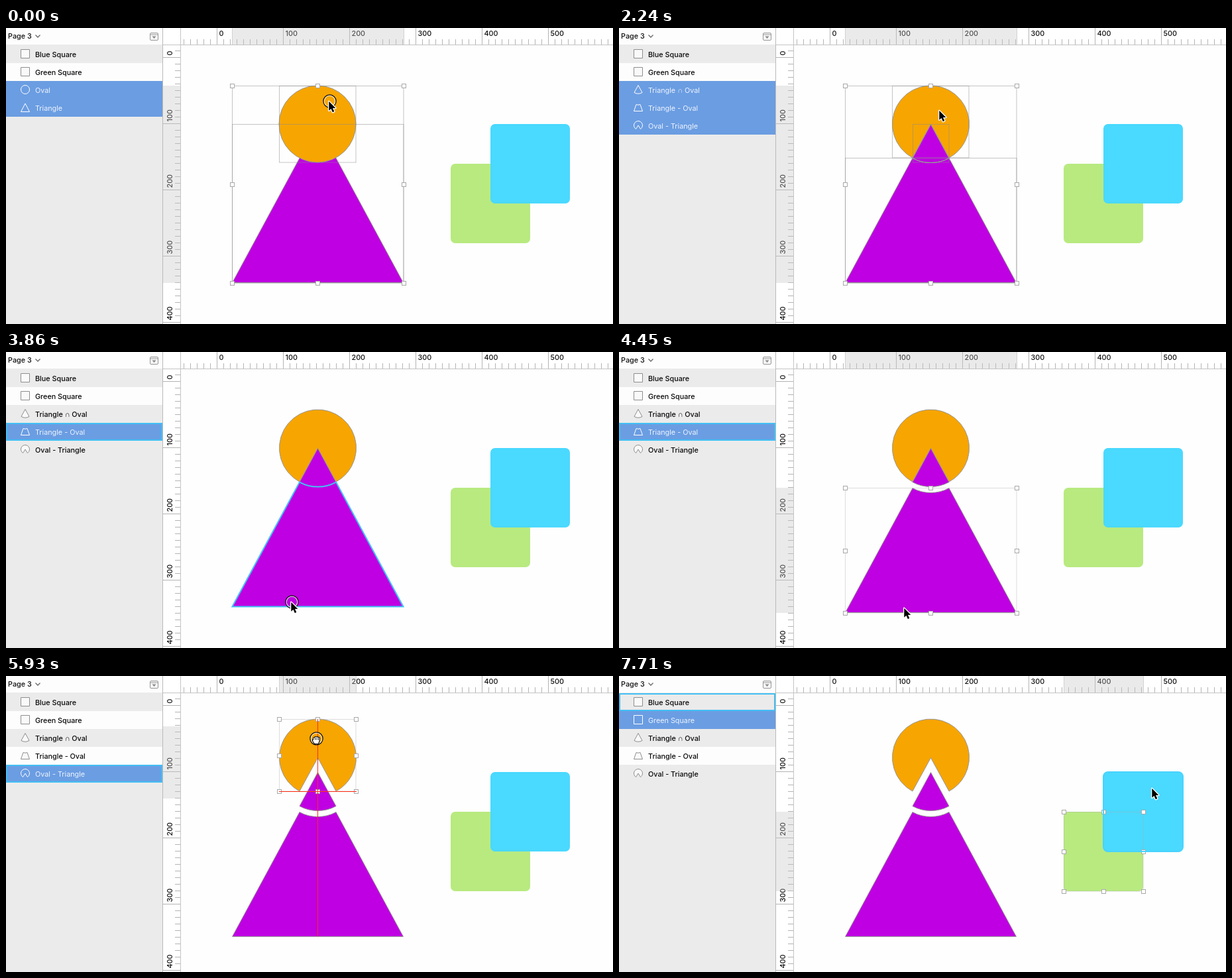
An HTML page with a canvas for the animation above (8000 ms loop, 916 by 447 pixels).

```html
<!DOCTYPE html>
<html lang="en">
<head>
<meta charset="utf-8">
<title>Shape editor</title>
<style>
html, body { margin: 0; width: 100%; height: 100%; overflow: hidden; background: #fefefe; }
canvas { display: block; width: 916px; height: 447px; }
</style>
</head>
<body>
<canvas id="stage" width="916" height="447"></canvas>
<script>
const W = 916, H = 447, LOOP = 8000;
const SIDE = 236, ROW = 27, TOP = 26;
const c = document.getElementById('stage').getContext('2d');
const FONT = '10.8px Inter, Roboto, sans-serif';
const GREY = '#979797', ACCENT = '#42bff5', PICKED = '#6b9de2';

// Shape geometry: the oval is centred on the tip of the triangle.
const CX = 470.5, CY = 145.5, R = 58, BASE = 384.5, HALF = 129;
const A = Math.atan(HALF / (BASE - CY));
const DX = R * Math.sin(A), DY = R * Math.cos(A);
const DOWN = Math.PI / 2;

const shapes = {
  blue: { name: 'Blue Square', fill: '#4ad9ff', box: [731, 145, 120, 120] },
  green: { name: 'Green Square', fill: '#b8ea80', box: [671, 205, 120, 120] },
  oval: { name: 'Oval', fill: '#f7a500', box: [412, 87, 116, 116] },
  tri: { name: 'Triangle', fill: '#bf00e2', box: [341, 145, 259, 240] },
  cone: { name: 'Triangle ∩ Oval', fill: '#bf00e2', box: [443, 145, 55, 58] },
  skirt: { name: 'Triangle - Oval', fill: '#bf00e2', box: [341, 196, 259, 189] },
  pac: { name: 'Oval - Triangle', fill: '#f7a500', box: [412, 87, 116, 109] }
};
const whole = ['blue', 'green', 'oval', 'tri'];
const split = ['blue', 'green', 'cone', 'skirt', 'pac'];
const parts = ['cone', 'skirt', 'pac'];

// [time, pointer x, pointer y, changes]; changes carry over to later steps.
// rows: picked rows, sel: shapes with handles, hot: outlined row, glow: outlined shape
const steps = [
  [0, 488, 110, { list: whole, rows: ['oval', 'tri'], sel: ['oval', 'tri'], ring: true,
    hot: '', glow: '', hand: false, skirt: 0, pac: 0, lag: 0, guide: '' }],
  [150, 488, 110, { ring: false }],
  [1790, 488, 110, { rows: [] }],
  [1940, 488, 110, { list: split, rows: parts, sel: parts }],
  [2240, 484, 124],
  [2390, 471, 168],
  [2530, 449, 232],
  [2680, 421, 306],
  [2830, 397, 369],
  [2980, 381, 414],
  [3120, 377, 427],
  [3270, 377, 427, { rows: [], sel: [], ring: true }],
  [3420, 397, 408, { ring: false }],
  [3560, 431, 377, { hot: 'skirt', glow: 'skirt' }],
  [3860, 431, 377, { rows: ['skirt'], ring: true }],
  [4010, 431, 379, { sel: ['skirt'], glow: '', hand: true, skirt: 2, guide: 'v' }],
  [4160, 431, 383, { skirt: 6 }],
  [4300, 431, 386, { skirt: 9 }],
  [4450, 431, 386, { ring: false, hand: false, guide: '' }],
  [4600, 439, 340],
  [4750, 453, 251],
  [4890, 463, 180, { hot: 'cone', glow: 'cone' }],
  [5040, 465, 129, { hot: 'pac', glow: 'pac' }],
  [5190, 465, 110],
  [5490, 467, 113, { rows: ['pac'], sel: [], ring: true }],
  [5640, 468, 110, { sel: ['pac'], glow: '', hand: true, pac: -3, guide: 'v' }],
  [5790, 468, 103, { pac: -11 }],
  [5930, 468, 94, { pac: -22, lag: 11, guide: 'vh' }],
  [6080, 468, 94, { lag: 0 }],
  [6230, 468, 94, { ring: false, hand: false, guide: '' }],
  [6380, 511, 111, { hot: 'pac' }],
  [6530, 585, 168, { hot: '' }],
  [6670, 706, 268, { hot: 'green', glow: 'green' }],
  [7120, 706, 268, { rows: ['green'], sel: [], ring: true }],
  [7270, 706, 268, { sel: ['green'], glow: '', ring: false }],
  [7420, 722, 252],
  [7560, 775, 198, { hot: 'blue', glow: 'blue' }],
  [7710, 805, 169]
];

function stateAt(t) {
  const s = {};
  for (const [start, x, y, change] of steps) {
    if (start > t) break;
    Object.assign(s, { x: x + 0.5, y: y + 0.5 }, change);
  }
  return s;
}

function line(x1, y1, x2, y2, color, width = 1) {
  c.strokeStyle = color;
  c.lineWidth = width;
  c.beginPath();
  c.moveTo(x1, y1);
  c.lineTo(x2, y2);
  c.stroke();
}

function rect(x, y, w, h, color) {
  c.fillStyle = color;
  c.fillRect(x, y, w, h);
}

function text(str, x, y, color, weight = 500) {
  c.font = weight + ' ' + FONT;
  c.fillStyle = color;
  c.fillText(str, x, y);
}

function poly(points) {
  const p = new Path2D();
  points.forEach(([x, y]) => p.lineTo(x, y));
  p.closePath();
  return p;
}

function paint(p, fill, stroke, width = 1) {
  if (fill) {
    c.fillStyle = fill;
    c.fill(p);
  }
  if (stroke) {
    c.strokeStyle = stroke;
    c.lineWidth = width;
    c.stroke(p);
  }
}

function outline(id, dy) {
  const p = new Path2D(), y = CY + dy;
  if (id === 'oval') p.arc(CX - 0.5, y - 0.5, R, 0, 7);
  else if (id === 'tri') return poly([[CX, y], [CX + HALF, BASE], [CX - HALF, BASE]]);
  else if (id === 'cone') {
    p.moveTo(CX, y);
    p.arc(CX, y, R, DOWN - A, DOWN + A);
  } else if (id === 'pac') {
    p.moveTo(CX, y);
    p.arc(CX, y - 0.5, R, DOWN + A, DOWN - A + 2 * Math.PI);
  } else if (id === 'skirt') {
    p.moveTo(CX - HALF, BASE + dy);
    p.lineTo(CX - DX, y + DY);
    p.arc(CX, y, R, DOWN + A, DOWN - A, true);
    p.lineTo(CX + HALF, BASE + dy);
  } else p.roundRect(...shapes[id].box, 7);
  p.closePath();
  return p;
}

const shift = (s, id) => (id === 'skirt' || id === 'pac' ? s[id] : 0);

function boxOf(s, id) {
  const [x, y, w, h] = shapes[id].box;
  return [x, y + shift(s, id), w, h];
}

function union(s) {
  const all = s.sel.map(id => boxOf(s, id));
  const x = Math.min(...all.map(b => b[0])), y = Math.min(...all.map(b => b[1]));
  return [x, y, Math.max(...all.map(b => b[0] + b[2])) - x, Math.max(...all.map(b => b[1] + b[3])) - y];
}

function drawShapes(s) {
  for (const id of [...s.list].reverse()) {
    const soft = id === 'blue' || id === 'green';
    paint(outline(id, shift(s, id)), shapes[id].fill, soft ? '' : GREY);
  }
}

function drawSelection(s) {
  if (!s.sel.length) return;
  const many = s.sel.length > 1;
  c.lineWidth = 1;
  c.strokeStyle = many ? 'rgba(140,140,140,.5)' : 'rgba(170,170,170,.4)';
  const frame = ([x, y, w, h]) => c.strokeRect(x + 0.5, y + 0.5, w - 0.5, h - 0.5);
  s.sel.forEach(id => frame(boxOf(s, id)));
  const [x, y, w, h] = union(s);
  if (many) {
    frame([x, y, w, h]);
    if (s.sel.includes('cone')) paint(outline('cone', 0), '', GREY);
  }
  for (let i = 0; i < 3; i++) for (let j = 0; j < 3; j++) {
    if (i === 1 && j === 1) continue;
    const hx = Math.floor(x + w * i / 2), hy = Math.round(y + h * j / 2);
    rect(hx - 3, hy - 3, 7, 7, '#fff');
    c.strokeStyle = '#a9a9a9';
    c.strokeRect(hx - 2.5, hy - 2.5, 6, 6);
  }
}

function drawGuides(s) {
  if (!s.guide) return;
  const top = Math.min(87, 87 + s.pac);
  line(CX, top, CX, BASE + s.skirt, '#ff2a12');
  if (s.guide === 'vh') line(412, 196.5 + s.pac, 529, 196.5 + s.pac, '#ff2a12');
}

function drawRulers(s) {
  rect(SIDE, 0, W - SIDE, 25, '#fff');
  rect(SIDE, 0, 27, H, '#fff');
  for (let i = -5; i < 60; i++) {
    const major = i % 10 === 0, x = 318.5 + i * 10;
    line(x, major ? 0 : 17, x, 25, '#b4b4b4');
    if (major) text(String(i * 10), x + 3, 12, '#111');
  }
  for (let i = -1; i < 41; i++) {
    const major = i % 10 === 0, y = 44.5 + i * 10;
    line(major ? SIDE : 255, y, 263, y, '#b4b4b4');
    if (!major) continue;
    c.save();
    c.translate(251, y - 3);
    c.rotate(-DOWN);
    text(String(i * 10), 0, 0, '#111');
    c.restore();
  }
  if (s.sel.length) {
    const [x, y, w, h] = union(s), tint = 'rgba(196,196,196,.36)';
    rect(x, 0, w, 25, tint);
    rect(SIDE + 1, y + s.lag, 26, h, tint);
    for (const e of [x, x + w]) line(e + 0.5, 0, e + 0.5, 25, '#d2d2d2');
  }
  line(0, 25.5, W, 25.5, '#c4c4c4');
  line(263.5, 0, 263.5, H, '#c4c4c4');
  line(SIDE + 0.5, 0, SIDE + 0.5, H, '#b9b9b9');
}

function icon(id, y, picked) {
  const x = 29;
  let p = new Path2D();
  if (id === 'blue' || id === 'green') p.rect(x - 6.5, y - 6.5, 13, 13);
  else if (id === 'oval') p.arc(x, y, 6.5, 0, 7);
  else if (id === 'tri') p = poly([[x, y - 6], [x + 6.5, y + 6.5], [x - 6.5, y + 6.5]]);
  else if (id === 'cone') {
    p.moveTo(x, y - 6.5);
    p.lineTo(x + 6, y + 4.5);
    p.quadraticCurveTo(x, y + 8, x - 6, y + 4.5);
  } else if (id === 'skirt') {
    p.moveTo(x - 3, y - 4.5);
    p.quadraticCurveTo(x, y - 3, x + 3, y - 4.5);
    p.lineTo(x + 6.5, y + 5.5);
    p.lineTo(x - 6.5, y + 5.5);
  } else {
    p.moveTo(x, y);
    p.arc(x, y, 6.5, DOWN + 0.55, DOWN - 0.55 + 2 * Math.PI);
  }
  p.closePath();
  paint(p, picked ? '' : '#f9f9f9', picked ? '#fff' : '#8e8e8e');
}

function drawSidebar(s) {
  rect(0, 0, SIDE, H, '#ebebeb');
  rect(0, 0, SIDE, 25, '#fdfdfd');
  text('Page 3', 3, 16, '#111');
  c.strokeStyle = '#666';
  c.lineWidth = 1.3;
  c.beginPath();
  c.moveTo(44.5, 10.5);
  c.lineTo(48, 14);
  c.lineTo(51.5, 10.5);
  c.stroke();
  const p = new Path2D();
  p.roundRect(217.5, 7.5, 12, 11, 1.5);
  paint(p, '#f6f6f6', '#969696');
  line(218, 10, 229, 10, '#969696');
  paint(poly([[220.5, 12.5], [226.5, 12.5], [223.5, 16]]), '#888');

  s.list.forEach((id, i) => {
    const y = TOP + i * ROW, picked = s.rows.includes(id);
    if (picked) rect(0, y, SIDE, ROW, PICKED);
    else if (i % 2) rect(0, y, SIDE, ROW, id === 'tri' ? '#f0f0f0' : '#fdfdfd');
    icon(id, y + 13.5 - 0.5, picked);
    text(shapes[id].name, 44, y + 18, picked ? '#edf3fd' : '#0a0a0a', picked ? 400 : 500);
  });
  const hot = s.list.indexOf(s.hot);
  if (hot >= 0) {
    c.strokeStyle = ACCENT;
    c.lineWidth = 2;
    c.strokeRect(1, TOP + hot * ROW + 1, SIDE - 2, ROW - 2);
  }
}

const arrow = poly([[0, 0], [0, 14], [3.2, 11.1], [5.6, 16.4], [8, 15.3], [5.7, 10.2], [10, 10.2]]);

function drawPointer(s) {
  c.save();
  c.translate(s.x, s.y);
  if (s.ring) {
    const ring = (r, color, width) => {
      const p = new Path2D();
      p.arc(0, 0, r, 0, 7);
      paint(p, '', color, width);
    };
    ring(8.4, 'rgba(255,255,255,.8)', 1.4);
    ring(9.6, '#151515', 1.3);
  }
  c.lineJoin = 'round';
  if (s.hand) {
    const fist = new Path2D('M-5 0Q-5-2-3-1.5Q-2.5-3.5-.5-2.5Q1-3.5 2.5-2Q5-2.5 5 0L4.5 4L3 8H-3L-6 3.5Q-6.5 1-5 2Z');
    paint(fist, '#fff', '#111', 1.2);
    for (const x of [-2, 0.5, 3]) line(x, -1, x, 2, '#111');
  } else {
    c.translate(-1.2, 0.3);
    paint(arrow, '', '#fff', 2.6);
    paint(arrow, '#000');
  }
  c.restore();
}

function draw(t) {
  const s = stateAt(t);
  rect(0, 0, W, H, '#fefefe');
  c.lineJoin = 'miter';
  drawShapes(s);
  drawSelection(s);
  if (s.glow) paint(outline(s.glow, shift(s, s.glow)), '', s.glow === 'blue' ? '#49d3ff' : ACCENT, 2);
  drawGuides(s);
  drawRulers(s);
  drawSidebar(s);
  drawPointer(s);
}

const begin = performance.now();
function tick() {
  draw((performance.now() - begin) % LOOP);
  requestAnimationFrame(tick);
}
tick();
</script>
</body>
</html>
```
